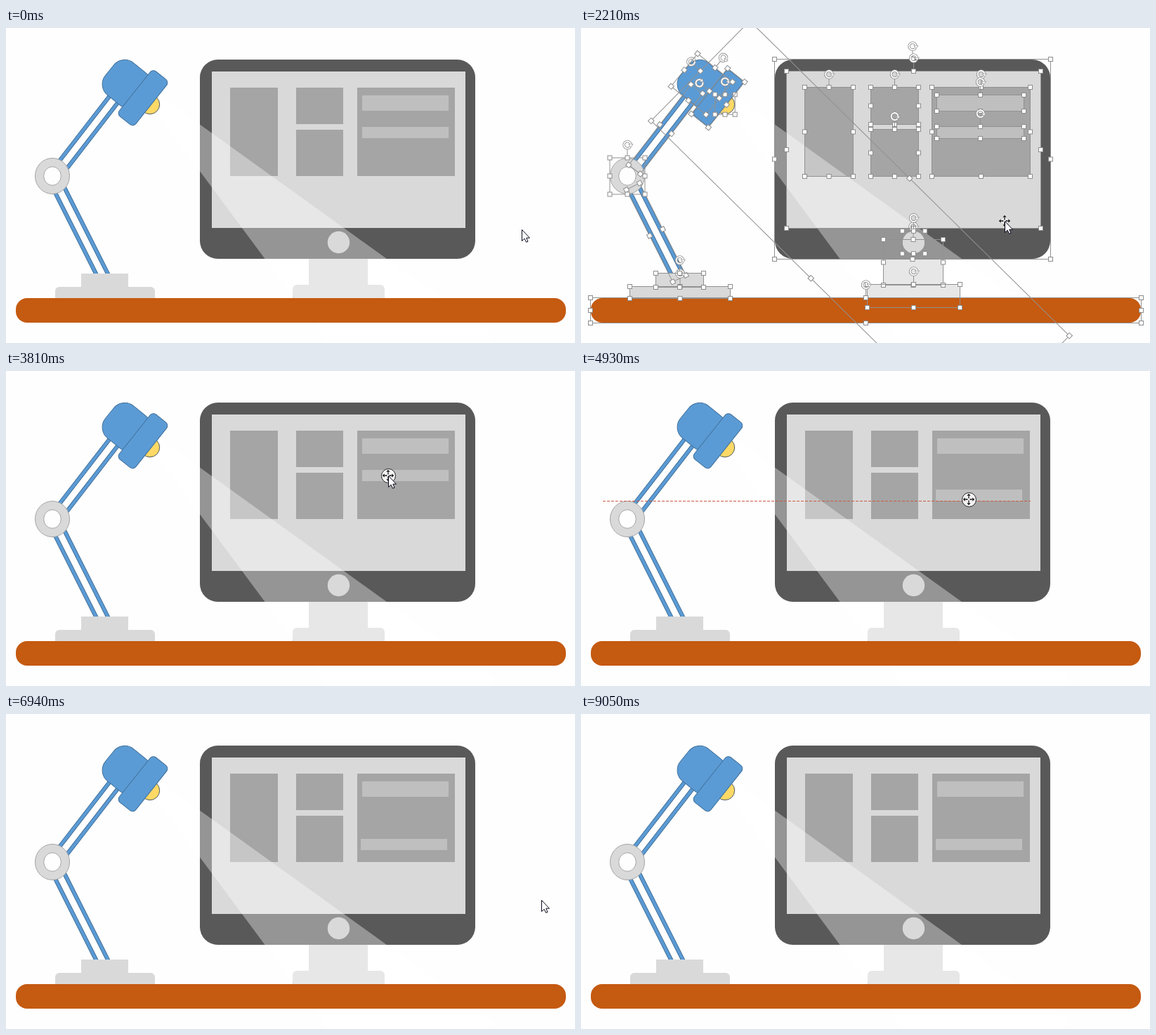
Recreate the animation shown at these times as an HTML page. Size 810 px wide and 449 px high, loop 9570 ms.

```html
<!DOCTYPE html>
<html lang="en">
<head>
<meta charset="utf-8">
<title>Desk illustration</title>
<style>
  html, body { margin: 0; width: 100%; height: 100%; overflow: hidden; background: #fefefe; }
  svg { display: block; width: 810px; height: 449px; }
  .grey { fill: #d9d9d9; }
  .panel { fill: #a5a5a5; }
  .bar { fill: #bfbfbf; }
  .blue { fill: #5b9bd5; stroke: #41719c; fill-rule: evenodd; }
  .ring { stroke: #a5a5a5; }
  .frame { fill: none; stroke: #919191; }
  .grip { fill: #fff; stroke: #8c8c8c; }
  .turn-edge { fill: none; stroke: #929292; stroke-width: 3.6; }
  .turn { fill: none; stroke: #fff; stroke-width: 1.8; }
  .head { fill: #fff; stroke: #929292; stroke-width: .8; }
</style>
</head>
<body>
<svg viewBox="0 0 810 449">
  <defs>
    <g id="spin">
      <path class="turn-edge" d="M4 3.2A5 5 0 1 1 5 -1"/>
      <path class="head" d="M1.8 -.8H8L5 3.4Z"/>
      <path class="turn" d="M4 3.2A5 5 0 1 1 5 -1"/>
    </g>
  </defs>

  <g id="art">
    <!-- monitor -->
    <rect class="grey" x="431" y="302" width="84" height="64"/>
    <rect class="grey" x="408" y="366" width="131" height="32" rx="6"/>
    <rect x="276" y="45" width="392" height="284" rx="25.5" fill="#595959"/>
    <rect class="grey" x="293" y="62" width="361" height="223"/>
    <rect class="panel" x="319" y="85" width="68" height="126"/>
    <rect class="panel" x="413" y="85" width="67" height="52"/>
    <rect class="panel" x="413" y="145" width="67" height="66"/>
    <rect class="panel" x="500" y="85" width="139" height="126"/>
    <rect class="bar" x="507" y="96" width="123" height="22"/>
    <rect class="bar" id="bar" x="507" y="141" width="123" height="16"/>

    <!-- light beam -->
    <path d="M0 -319 99.5 319H-99.5Z" fill="#fff" fill-opacity=".36" transform="translate(397.5 285.5) rotate(-45.4)"/>
    <circle class="grey" cx="473.5" cy="305.5" r="15.7"/>
    <rect x="14" y="385" width="783" height="35" rx="16" fill="#c55a11"/>

    <!-- lamp -->
    <path class="blue" d="M-10 -72h20v144h-20ZM-5 -67h10v134h-10Z" transform="translate(120.5 144.2) rotate(37.7)"/>
    <path class="blue" d="M-10 -73h20v146h-20ZM-5 -68h10v136h-10Z" transform="translate(107 291.5) rotate(-26.7)"/>
    <path class="grey" d="M70 385V375a6 6 0 0 1 6 -6H206a6 6 0 0 1 6 6V385Z"/>
    <rect class="grey" x="107" y="350" width="67" height="19"/>
    <ellipse class="grey ring" cx="66" cy="211" rx="24.5" ry="25.5"/>
    <ellipse class="ring hole" cx="66" cy="211" rx="12.3" ry="13.3" fill="#fefefe"/>
    <circle cx="205" cy="109" r="13.7" fill="#ffd966" stroke="#4d5b66"/>
    <rect class="blue" x="-31.5" y="-29.5" width="63" height="59" rx="20" transform="translate(172 80) rotate(39)"/>
    <rect class="blue" x="-41" y="-15" width="82" height="30" rx="6" transform="translate(195 99.7) rotate(-51.5)"/>
  </g>

  <g id="all"></g>
  <g id="picked"></g>
  <path id="guide" d="M31 185.5H640" stroke="#cc5a43" stroke-dasharray="4 2"/>

  <g id="pointer">
    <circle id="press" cx=".5" cy=".5" r="10" fill="#fff" fill-opacity=".85" stroke="#222"/>
    <g id="cross">
      <path d="M-6 0H6M0 -6V6" stroke="#fff" stroke-width="3"/>
      <path d="M-6 0H6M0 -6V6" stroke="#000" stroke-width="1.3" stroke-dasharray="4.5 3"/>
      <path d="M-8.5 0l3.5 -3v6ZM8.5 0l-3.5 -3v6ZM0 -8.5l-3 3.5h6ZM0 8.5l-3 -3.5h6Z" stroke="#fff" stroke-width=".5"/>
    </g>
    <path id="arrow" d="M.5 .5V16.5L4.2 13.2 6.6 18.3 9 17.3 6.8 12.2H11.5Z" fill="#fff" stroke="#0a0a1e"/>
  </g>
</svg>
<script>
const LOOP = 9570, STEP = 135;
const $ = id => document.getElementById(id);

// Selection outline of a shape, in the shape's own rotated frame.
function outline(shape) {
  const b = shape.getBBox();
  const x = b.x - .5, y = b.y - .5, w = b.width + 1, h = b.height + 1, cx = x + w / 2;
  const xs = w > 24 ? [0, .5, 1] : [0, 1];
  const ys = h > 34 ? [0, .5, 1] : [0, 1];
  let svg = `<rect class="frame" x="${x}" y="${y}" width="${w}" height="${h}"/>`;
  if (w > 24) svg += `<path class="frame" d="M${cx} ${y}v-13"/><use href="#spin" x="${cx}" y="${y - 18.5}"/>`;
  for (const i of xs) for (const j of ys) {
    if (i === .5 && j === .5) continue;
    svg += `<rect class="grip" x="${x + i * w - 3}" y="${y + j * h - 3}" width="6" height="6"/>`;
  }
  return `<g transform="${shape.getAttribute('transform') || ''}">${svg}</g>`;
}
$('all').innerHTML = [...document.querySelectorAll('#art > :not(.hole)')].map(outline).join('');
$('picked').innerHTML = outline($('bar'));

// Pointer moves: start, end, x, y, ease-out power
const DRAG = [4780, 5470, 551, 191, 3.5];
const moves = [
  [0, STEP, 734, 287],
  [830, 980, 688, 264],
  [1540, 2210, 603, 275],
  [2490, 2890, 712, 300],
  [3020, 3420, 653, 302],
  [3540, 3810, 544, 149],
  [3960, 4480, 554, 158],
  DRAG,
  [6400, 6670, 725, 302],
  [6805, 6940, 762, 265],
  [7750, 8230, 720, 269],
  [8660, 8920, 744, 421]
];
const presses = [[400, 550], [2890, 3020], [3810, 3960], [4630, 5720], [6670, 6805]];

const within = (t, a, b) => t >= a && t < b;
const show = (id, on) => $(id).style.display = on ? '' : 'none';

function progress([from, to, , , power = 1], t) {
  if (t < from) return 0;
  const n = Math.round((to - from) / STEP);
  const k = Math.min(n, Math.floor((t - from) / (to - from) * n + 1e-6));
  return 1 - (1 - (k + 1) / (n + 1)) ** power;
}

function pointerAt(t) {
  const i = moves.findLastIndex(m => m[0] <= t);
  const [, , x, y] = moves[i], [, , px, py] = moves[Math.max(0, i - 1)];
  const p = progress(moves[i], t);
  return [Math.round(px + (x - px) * p), Math.round(py + (y - py) * p)];
}

const start = performance.now();
function draw(now) {
  const t = Math.max(0, now - start) % LOOP;
  const [x, y] = pointerAt(t);
  const dragging = within(t, DRAG[0], 5720);
  $('pointer').setAttribute('transform', `translate(${x} ${y})`);
  show('pointer', t < 9050);
  show('press', presses.some(([a, b]) => within(t, a, b)));
  show('cross', within(x, 276, 668) && within(y, 45, 329));
  show('arrow', !dragging);

  const d = progress(DRAG, t);
  const shift = `translate(${Math.round(-2 * d)} ${Math.round(37 * d)})`;
  $('bar').setAttribute('transform', shift);
  $('picked').setAttribute('transform', shift);
  show('picked', within(t, 3960, 6805) && !dragging);
  show('all', within(t, 1540, 2890));
  show('guide', within(t, 4918, 5050));
  requestAnimationFrame(draw);
}
draw(start);
</script>
</body>
</html>
```
